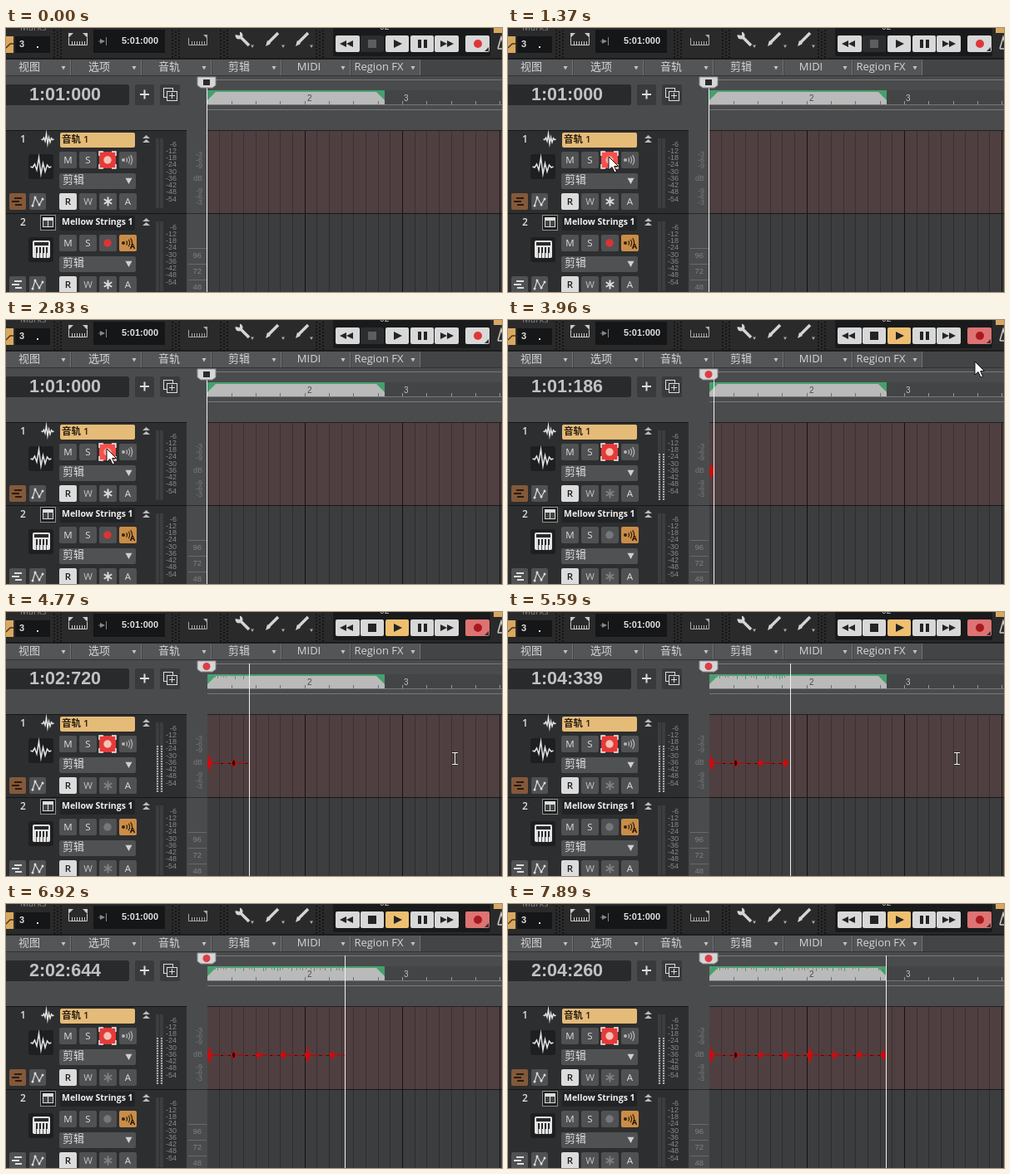
These frames come from a looping animation (596 by 318 pixels, 7.96 s). An HTML page with a canvas:

```html
<!DOCTYPE html>
<html lang="zh">
<head>
<meta charset="utf-8">
<title>Recording a track</title>
<style>
html, body { margin: 0; width: 100%; height: 100%; overflow: hidden; background: #4a4b4d; }
canvas { display: block; }
</style>
</head>
<body>
<canvas id="stage" width="596" height="318"></canvas>
<script>
const g = document.getElementById('stage').getContext('2d');
const LOOP = 7960, STEP = 69, GRID_START = 4485;
const LEFT = 242, BEAT = 29.3, TICKS = 960;
const REC_START = 3830, REC_CLICK = 3600;
const UI = '"Open Sans", "Noto Sans CJK SC", "Noto Sans CJK", sans-serif';
const ARIAL = '"Liberation Sans", "Noto Sans CJK SC", "Noto Sans CJK", sans-serif';

// [time, ticks] and [time, x, y]
const PLAY = [[REC_START, 0], [4761, 1680], [5244, 2655], [5589, 3219], [6900, 5444], [7866, 6980]];
const TO_TRACK = [[330, 539, 0], [610, 400, 160], [850, 240, 262], [1090, 157, 200], [1300, 121, 155], [2830, 121, 155]];
const TO_RECORD = [[2830, 121, 155], [3000, 190, 150], [3350, 470, 65], [3600, 567, 18], [3860, 567, 18], [4360, 539, 176]];

function along(knots, t, k = 1) {
  if (t <= knots[0][0]) return knots[0][k];
  for (let i = 1; i < knots.length; i++) {
    const a = knots[i - 1], b = knots[i];
    if (t <= b[0]) return a[k] + (b[k] - a[k]) * (t - a[0]) / (b[0] - a[0]);
  }
  return knots[knots.length - 1][k];
}

function rect(x, y, w, h, color) { g.fillStyle = color; g.fillRect(x, y, w, h); }
function box(x, y, w, h, color, r = 2) {
  g.fillStyle = color; g.beginPath(); g.roundRect(x, y, w, h, r); g.fill();
}
function frame(x, y, w, h, color) { g.strokeStyle = color; g.lineWidth = 1; g.strokeRect(x + .5, y + .5, w - 1, h - 1); }
function circle(x, y, r, color) { g.fillStyle = color; g.beginPath(); g.arc(x, y, r, 0, 7); g.fill(); }
function trace(points) {
  g.beginPath();
  for (let i = 0; i < points.length; i += 2) g.lineTo(points[i], points[i + 1]);
}
function poly(color, ...points) { trace(points); g.fillStyle = color; g.fill(); }
function line(color, width, ...points) { trace(points); g.strokeStyle = color; g.lineWidth = width; g.stroke(); }
function text(s, x, y, size, color, { align = 'left', weight = '', font = UI } = {}) {
  g.font = `${weight} ${size}px ${font}`;
  g.textAlign = align; g.textBaseline = 'middle';
  g.fillStyle = color; g.fillText(s, x, y);
}
function down(x, y, r, color = '#d0d0d0') { poly(color, x - r, y - r * .8, x + r, y - r * .8, x, y + r); }
function right(x, y, r, color) { poly(color, x - r, y - r, x + r, y, x - r, y + r); }

function grip(x) {
  for (let y = 2; y < 35; y += 4)
    for (let c = 0; c < 3; c++) rect(x + c * 4, y + c % 2 * 2, 2, 2, '#151516');
}

function rulerIcon(x, y, color) {
  line(color, 1, x - 10.5, y, x - 10.5, y + 8.5, x + 11.5, y + 8.5, x + 11.5, y);
  for (let i = -7; i < 11; i += 3) rect(x + i, y + 4, 1, 4, color);
}

function toolbar(t, recording) {
  rect(0, 0, 596, 38, '#2a2a2b');
  rect(0, 36, 596, 2, '#1c1c1d');
  text('Marks', 17, 0, 11, '#858585');
  rect(0, 10, 9, 20, '#d9a860');
  line('#4b3619', 1.5, 0, 24, 5, 19, 9, 19);
  rect(11, 10, 42, 20, '#151617');
  text('3', 16, 20, 11, '#ddd', { weight: 'bold', font: ARIAL });
  rect(37, 22, 2, 2, '#ddd');
  [57, 199, 257, 372].forEach(grip);
  rulerIcon(86, 12, '#c9c9c9');
  poly('#c9c9c9', 75, 6, 81, 6, 75, 12);
  poly('#c9c9c9', 98, 6, 92, 6, 98, 12);
  rulerIcon(230, 12, '#a9a9a9');
  poly('#a9a9a9', 242, 8, 237, 8, 242, 13);
  rect(105, 2, 86, 28, '#151617');
  line('#777', 1, 111, 16, 118, 16); right(116, 16, 3, '#888'); rect(120, 11, 1, 10, '#888');
  text('5:01:000', 139, 16, 11, '#e0e0e0', { weight: 'bold', font: ARIAL });

  line('#d4d4d4', 3.5, 281, 10, 292, 21);
  circle(280, 9, 4.5, '#d4d4d4'); poly('#2a2a2b', 275, 3, 281, 3, 281, 9, 275, 8);
  for (const x of [320, 356]) {
    line('#d4d4d4', 3.5, x - 5, 18, x + 7, 6);
    poly('#d4d4d4', x - 8, 22, x - 6, 15, x - 2, 19);
  }
  [296, 333, 367].forEach(x => down(x, 22, 2, '#aaa'));

  box(393, -4, 189, 38, '#191a1b');
  rect(586, 0, 10, 6, '#d9a860');
  text('02', 449, -1, 10, '#bbb');
  const light = '#d8d8d8', ink = '#242424';
  const key = (x, w, color = light) => box(x, 9, w, 20, color);
  key(396, 29);
  right(413, 19, -4, ink); right(405, 19, -4, ink);
  key(426, 28, recording ? light : '#2c2d2e');
  rect(435, 14, 10, 10, recording ? ink : '#5c5d5e');
  key(456, 28, recording ? '#eebf70' : light);
  right(471, 19, 5, ink);
  key(486, 28);
  rect(495, 14, 4, 10, ink); rect(502, 14, 4, 10, ink);
  key(515, 29);
  right(526, 19, 4, ink); right(534, 19, 4, ink);
  key(552, 29, recording ? '#dd7373' : t > REC_CLICK ? '#f0dada' : light);
  circle(567, 19, 5, recording ? '#a91a20' : '#e0363a');
  poly('#333', 580, 23, 580, 28, 575, 28);
  line('#ccc', 1.5, 591, 25, 595, 11, 599, 25, 591, 25);
}

function menus() {
  rect(0, 38, 596, 19, '#434446');
  const items = [['视图', 0, 78, 28], ['选项', 79, 84, 112], ['音轨', 164, 83, 196],
    ['剪辑', 248, 83, 280], ['MIDI', 332, 82, 364], ['Region FX', 415, 83, 448]];
  for (const [name, x, w, center] of items) {
    rect(x, 38, w, 19, '#545557');
    rect(x + w - 1, 38, 1, 19, '#727375');
    text(name, center, 47.5, 13, '#d4d5d6', { align: 'center' });
    down(x + w - 9, 48, 2.5, '#c4c5c6');
  }
  rect(0, 57, 596, 1, '#323335');
}

function clock(ticks) {
  rect(0, 58, 596, 66, '#4a4b4d');
  box(-4, 68, 152, 25, '#292a2b', 3);
  const pad = (n, w) => String(n).padStart(w, '0');
  const beat = Math.floor(ticks / TICKS);
  text(`${1 + (beat >> 2)}:${pad(1 + beat % 4, 2)}:${pad(ticks % TICKS, 3)}`,
    28, 81, 21.5, '#c0c1c2', { weight: 'bold', font: ARIAL });
  box(155, 68, 23, 25, '#393a3b');
  line('#ddd', 2, 161, 80, 172, 80); line('#ddd', 2, 166.5, 74.5, 166.5, 85.5);
  box(185, 68, 24, 25, '#393a3b');
  frame(189, 72, 12, 12, '#ddd');
  rect(193, 76, 13, 12, '#393a3b'); frame(193, 76, 13, 12, '#ddd');
  rect(196, 81, 7, 1, '#ddd'); rect(199, 78, 1, 7, '#ddd');
}

function wave(x, y, scale) {
  const heights = [0, 1, 3, 4, 11, 9, 4, 6, 2, 1, 0];
  const points = heights.flatMap((h, i) => [x + (i - 5) * 2.5 * scale, y + (i % 2 ? 1 : -1) * h * scale]);
  line('#e3e3e3', 1.5, ...points);
}

function button(x, y, label, { bg = '#505153', color = '#dedede', weight = '' } = {}) {
  box(x, y, 21, 20, bg);
  text(label, x + 10.5, y + 10.5, 11.5, color, { align: 'center', weight });
}

function star(x, y, color) {
  for (let a = 0; a < 3; a++) {
    const dx = 5.5 * Math.sin(a * Math.PI / 3), dy = 5.5 * Math.cos(a * Math.PI / 3);
    line(color, 2, x - dx, y - dy, x + dx, y + dy);
  }
}

function echo(x, y, color) {
  circle(x + 5, y + 10, 2, color);
  g.strokeStyle = color; g.lineWidth = 1.2;
  for (const r of [4.5, 7.5, 10.5]) { g.beginPath(); g.arc(x + 5, y + 10, r, -.6, .6); g.stroke(); }
}

// Shared header parts; y is the top of the track.
function header(y, number, recording) {
  rect(0, y, 217, 100, '#2d2e2f');
  rect(0, y - 1, 217, 1, '#151617');
  text(number, 17, y + 10.5, 12, '#e0e0e0', { weight: 600 });
  for (const d of [5, 10]) poly('#bbb', 164, y + d + 4, 168.5, y + d, 173, y + d + 4);
  button(64, y + 25, 'M');
  button(88, y + 25, 'S');
  box(64, y + 51, 92, 19, '#505153');
  text('剪辑', 68, y + 60, 13, '#dedede');
  down(147.5, y + 60, 4);
  const low = y + 75;
  box(4, low, 20, 20, y < 200 ? '#83593a' : '#505153');
  const ink = y < 200 ? '#2b1a0d' : '#ddd';
  rect(10, low + 5, 9, 2, ink); rect(7, low + 9, 9, 2, ink); rect(11, low + 13, 8, 2, ink);
  box(28, low, 20, 20, '#505153');
  line('#ddd', 1.2, 32, low + 15, 35, low + 5, 40, low + 14, 44, low + 7);
  [[32, 15], [35, 5], [40, 14], [44, 7]].forEach(([x, d]) => circle(x, low + d, 1.5, '#ddd'));
  button(64, low, 'R', { bg: '#dcdcdc', color: '#1c1c1c', weight: 600 });
  button(88, low, 'W', { color: '#c4c4c4' });
  button(112, low, '');
  star(122.5, low + 10, recording ? '#808080' : '#dedede');
  button(136, low, 'A');
  rect(180, y + 9, 4, 84, '#3c3d3f'); rect(185, y + 9, 4, 84, '#3c3d3f');
  for (let i = 1; i < 10; i++)
    text(`-${i * 6}`, 205, y + 8 + i * 8.25, 9, '#88898b', { align: 'right', font: ARIAL });
}

function isArmed(t) { return t < 2100 || t >= 2370; }

function audioTrack(t, recording) {
  const y = 124, armed = isArmed(t);
  header(y, '1', recording);
  wave(50, 134, .6);
  box(65, 126, 90, 18, '#e5bb78');
  text('音轨 1', 67, 134.5, 11.5, '#2b2112', { weight: 600 });
  box(27, 152, 30, 30, '#1e1f20', 3);
  wave(42, 167, 1);
  const hover = t > 1250 && t < 2900;
  box(112, 149, 20, 20, armed ? (hover ? '#f5504d' : '#e53a3a') : '#505153', 1);
  circle(122, 159, 4.7, armed ? (hover ? '#f6a9a0' : '#f4c3b5') : '#dc3434');
  for (const [cx, cy, dx, dy] of [[112, 149, 1, 1], [132, 149, -1, 1], [112, 169, 1, -1], [132, 169, -1, -1]])
    line('#f3f3f3', 1.4, cx + 5 * dx, cy, cx, cy, cx, cy + 5 * dy);
  button(136, 149, ''); echo(136, 149, '#b5b5b5');
  if (recording)
    for (let m = 161; m < 216; m += 3) { rect(181, m, 2, 2, '#a9aaab'); rect(186, m, 2, 2, '#a9aaab'); }
}

function synthTrack(recording) {
  header(224, '2', recording);
  rect(41, 225, 19, 19, '#1e1f20'); frame(41, 225, 19, 19, '#8f8f8f');
  rect(44, 228, 13, 12, '#ddd'); rect(45, 232, 5, 7, '#444'); rect(51, 232, 5, 7, '#444');
  box(65, 226, 90, 18, '#222324');
  text('Mellow Strings 1', 67, 234.5, 10.5, '#f0f0f0', { weight: 'bold' });
  box(27, 252, 30, 30, '#1e1f20', 3);
  box(32, 256, 21, 21, '#e3e3e3');
  rect(34, 258, 17, 4, '#2a2a2a');
  for (let x = 36; x < 50; x += 4) { rect(x, 264, 2, 7, '#2a2a2a'); rect(x, 271, 1, 6, '#555'); }
  button(112, 249, '');
  circle(122, 259, 4.7, recording ? '#76777a' : '#dc3434');
  button(136, 249, '', { bg: '#ca8d48' }); echo(136, 249, '#33210d');
  text('A', 152, 264, 9, '#1c1208', { align: 'center', weight: 'bold' });
}

function scale() {
  rect(217, 98, 25, 220, '#4a4b4d');
  const marks = [['-3', 153], ['-6', 160], ['-9', 167], ['dB', 182], ['-9', 197], ['-6', 204], ['-3', 211]];
  for (const [s, y] of marks) text(s, 236, y, 9, '#77787a', { align: 'right', font: ARIAL });
  [96, 72, 48].forEach((n, i) => {
    const y = 274 + i * 19;
    text(n, 235, y, 9.5, '#808183', { align: 'right', font: ARIAL });
    rect(219, y - 9, 22, 1, '#68696b');
  });
  rect(217, 223, 25, 1, '#2a2b2c');
}

function timeline(t, head, recording) {
  const armed = isArmed(t);
  rect(242, 62, 354, 1, '#77787a');
  rect(242, 75, 354, 18, '#434446');
  rect(242, 75, 213, 16, '#45a06c');
  poly('#bababa', 252, 77, 445, 77, 455, 87, 455, 92, 242, 92, 242, 87);
  if (recording)
    for (let x = 244, i = 1; x < head - 2; x += 3.4, i++) {
      const noise = Math.abs(Math.sin(i * 78.23) * 437.5) % 1;
      if (noise > .3) rect(Math.round(x), 75, 1, 2 + Math.floor(noise * 5), noise > .65 ? '#45a06c' : '#85888a');
    }
  for (let b = 1; b < 13; b++) {
    const x = Math.floor(LEFT + b * BEAT);
    rect(x, 88, 1, 4, x < 455 ? '#6f7072' : '#96979a');
  }
  text('2', 362, 85, 10, '#4b4b4b', { font: ARIAL });
  text('3', 478, 85, 10, '#c0c1c3', { font: ARIAL });
  rect(242, 92, 354, 1, '#77787a');
  rect(242, 98, 354, 1, '#77787a');

  rect(242, 124, 354, 99, armed ? '#503f40' : '#3c3d3f');
  rect(242, 224, 354, 94, '#3c3d3e');
  for (let i = 1; i < 25; i++) {
    const x = Math.floor(LEFT + i * BEAT / 2), bar = i % 8 === 0;
    rect(x, 124, 1, 99, bar ? '#171313' : armed ? '#3c3031' : '#303133');
    rect(x, 224, 1, 94, bar ? '#121212' : '#2c2d2e');
  }
  rect(242, 123, 354, 1, '#202122'); rect(242, 223, 354, 1, '#161718');
}

function take(head) {
  g.save();
  g.beginPath(); g.rect(242, 124, head - 242, 99); g.clip();
  rect(242, 182, head - 242, 1, '#330b0d');
  const heights = [10, 6, 5, 6, 10, 6, 6, 7];
  heights.forEach((h, i) => {
    const x = LEFT + 2 + i * (BEAT + .3);
    rect(x + 3, 181.5, 11, 1.5, '#a80e12');
    rect(x + 17, 182, 6, 1, '#a80e12');
    poly('#c90d10', x - 4, 182, x - 1, 182 - h * .6, x, 182 - h, x + 1.5, 182 - h * .6, x + 4, 182,
      x + 1.5, 182 + h * .6, x, 182 + h, x - 1, 182 + h * .6);
    if (i === 1) poly('#170304', x - 2, 182, x, 178, x + 2, 182, x, 186);
  });
  g.restore();
}

function playhead(head, recording) {
  rect(Math.round(head), recording ? 62 : 72, 1, 256, '#f1f1f1');
  const flag = [230, 59, 252, 59, 252, 69, 248, 72, 234, 72, 230, 69];
  poly('#d6d6d6', ...flag);
  line('#8b8c8e', 1, ...flag, 230, 59);
  if (recording) circle(241, 65.5, 4.5, '#dc3d47');
  else rect(237, 62, 8, 7, '#2a2a2a');
}

function pointer(t) {
  if (t < 330 || t >= 5850) return;
  const path = t < 2830 ? TO_TRACK : TO_RECORD;
  const x = Math.round(along(path, t, 1)), y = Math.round(along(path, t, 2));
  if (x > 242 && y > 98) {
    for (const [color, width] of [['#1c1c1c', 3], ['#f4f4f4', 1.2]]) {
      line(color, width, x + .5, y - 6, x + .5, y + 7);
      line(color, width, x - 3, y - 6.5, x + 4, y - 6.5);
      line(color, width, x - 3, y + 7.5, x + 4, y + 7.5);
    }
    return;
  }
  g.save();
  g.translate(x, y);
  poly('#fff', 0, 0, 0, 16, 4, 12.5, 7, 19, 9.5, 18, 6.7, 11.5, 11.5, 11.5);
  g.closePath(); g.strokeStyle = '#111'; g.lineWidth = 1; g.stroke();
  g.restore();
}

function draw(now) {
  const t = now % LOOP;
  const recording = t >= REC_START;
  const stepped = GRID_START + STEP * Math.floor((t - GRID_START) / STEP);
  const ticks = Math.round(along(PLAY, stepped));
  const head = LEFT - .8 + ticks / TICKS * BEAT;
  toolbar(t, recording);
  menus();
  clock(ticks);
  audioTrack(t, recording);
  synthTrack(recording);
  scale();
  timeline(t, head, recording);
  if (recording) take(head);
  playhead(head, recording);
  pointer(t);
}

const start = performance.now();
function tick() {
  draw(performance.now() - start);
  requestAnimationFrame(tick);
}
tick();
</script>
</body>
</html>
```
